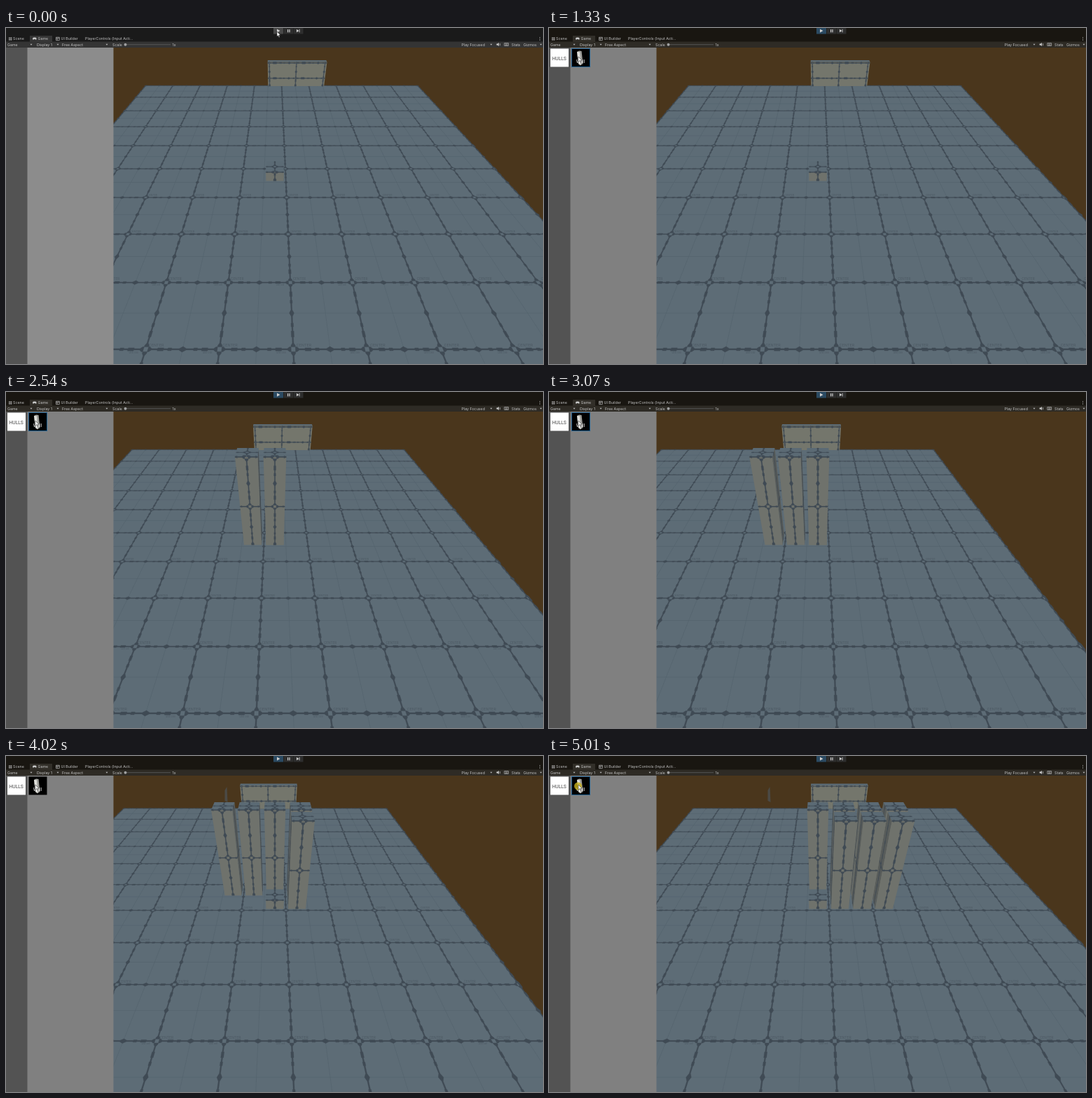
An HTML page that plays this animation: 767x480 px, repeating every 5.08 s.

```html
<!DOCTYPE html>
<html lang="en">
<head>
<meta charset="utf-8">
<title>Wall placement</title>
<style>
html, body { margin: 0; width: 100%; height: 100%; overflow: hidden; background: #4a361c; }
svg { display: block; width: 100vw; height: 100vh; }
text { font-family: Inter, "Open Sans", sans-serif; }
.ui text { font-size: 5.3px; fill: #c2c2c2; }
.mark { fill: #47535d; opacity: .75; }
</style>
</head>
<body>
<svg viewBox="0 0 767 480" preserveAspectRatio="none">
  <rect width="767" height="480" fill="#4a361c"/>
  <g id="scene"></g>

  <rect y="28" width="31" height="452" fill="#535353"/>
  <rect id="panel" x="30.5" y="28" width="123" height="452" fill="#8c8c8c"/>

  <g id="cards">
    <rect x="2" y="29.5" width="26" height="26" fill="#fff"/>
    <text x="14.7" y="45.8" font-size="6.7" text-anchor="middle" fill="#484848" style="font-family:Roboto,sans-serif">HULLS</text>
    <rect x="32.5" y="29.5" width="26" height="26" fill="#000"/>
    <path d="M40 34L43 32.5L46.5 33L48.5 51L44.5 53.5L42 51Z" fill="#9c9c98"/>
    <path d="M40 34L44 34.5L45.5 53L42 51Z" fill="#dededa"/>
    <text x="45" y="49.5" font-size="6.7" text-anchor="middle" fill="#fff" style="font-family:Roboto,sans-serif">Wall</text>
    <rect id="focus" x="32.5" y="29.5" width="26" height="26" fill="none" stroke="#1f5f8f"/>
  </g>

  <g class="ui">
    <rect id="top" width="767" height="20" fill="#1a1a1a"/>
    <rect id="tab" x="34" y="11" width="32" height="9" fill="#363636"/>
    <rect id="bar" y="19.5" width="767" height="8.5" fill="#343434"/>
    <g id="buttons">
      <rect id="play" x="382" y="0" width="14" height="8.5" fill="#484848"/>
      <rect x="396.5" y="0" width="14" height="8.5" fill="#2e2e2e"/>
      <rect x="411" y="0" width="13.5" height="8.5" fill="#2e2e2e"/>
    </g>
    <path d="M387 1.6L391.5 4L387 6.4ZM402 2h1.2v4.2h-1.2zM404.4 2h1.2v4.2h-1.2zM415 1.8L418.4 4L415 6.2ZM418.6 1.8h.9v4.4h-.9z" fill="#d0d0d0"/>
    <path d="M5 13v5M7.3 13v5M3.7 14.3h5M3.7 16.7h5M71.5 13.2h4.8v4.4h-4.8zM71.5 14.6h4.8M73.3 14.6v3" fill="none" stroke="#b8b8b8" stroke-width=".7"/>
    <path d="M38 15.2q0-1.7 1.7-1.7h2.2q1.7 0 1.7 1.7t-1.2 1.6l-.8-.8h-1.6l-.8.8q-1.2.1-1.2-1.6z" fill="#c8c8c8"/>
    <text x="10" y="17.2">Scene</text>
    <text x="45.5" y="17.2">Game</text>
    <text x="78.5" y="17.2">UI Builder</text>
    <text x="113" y="17.2">PlayerControls (Input Acti...</text>
    <path d="M762 13h.9v.9h-.9zM762 14.9h.9v.9h-.9zM762 16.8h.9v.9h-.9z" fill="#b8b8b8"/>
    <text x="2" y="25.5">Game</text>
    <text x="44" y="25.5">Display 1</text>
    <text x="80" y="25.5">Free Aspect</text>
    <text x="152" y="25.5">Scale</text>
    <path d="M172 23.7H235" stroke="#5e5e5e" stroke-width=".8"/>
    <circle cx="170.5" cy="23.7" r="2" fill="#a0a0a0"/>
    <text x="237.5" y="25.5">1x</text>
    <text x="650.5" y="25.5">Play Focused</text>
    <path d="M700.5 22.6h1.5l2-1.5v5l-2-1.5h-1.5zM705 22h.7v3.2h-.7z" fill="#c8c8c8"/>
    <path d="M711.8 21.6h5.8v3.8h-5.8zM713 23h3.4M713 24.3h3.4" fill="none" stroke="#bcbcbc" stroke-width=".7"/>
    <text x="722" y="25.5">Stats</text>
    <text x="739" y="25.5">Gizmos</text>
    <path id="arrows" fill="#b8b8b8"/>
  </g>

  <circle id="press" cx="41.5" cy="43" r="5.5" fill="#c9b21c" opacity=".8"/>
  <path id="cursor" d="M0 0V7.2L1.7 5.7L2.9 8.4L4 7.9L2.8 5.3H5Z" fill="#fff" stroke="#111" stroke-width=".5"/>
</svg>
<script>
const $ = id => document.getElementById(id);
const LOOP = 5080;
const CX = 384, CY = 254, FOCAL = 391.4, HEIGHT = 4;
const LINE = '#3f4a54', THIN = .009;

// Time, camera x, camera z
const MOVES = [[0, 0, 0], [2130, .5, 0], [2740, 1, 0], [3270, 1.5, 0], [3670, 1.5, -.5],
  [4020, 1, -.5], [4400, .5, -.5], [4680, 0, -.5]];
// Press time, release time, column x, column z
const CLICKS = [[1730, 1870, 0, 5], [2470, 2540, .5, 5], [2940, 3070, 1, 5], [3400, 3540, 1.5, 5],
  [3870, 3940, 1.5, 4.5], [4210, 4280, 1, 4.5], [4480, 4540, .5, 4.5], [5010, LOOP, 0, 4.5]];
const POINTER = [[0, 387, 5], [465, 387, 5], [660, 149, 58], [790, 92, 59], [990, 49, 49], [1130, 42, 41]];

// Half width of a grid line along one tile
const HALF = [[0, .03], [.05, .03], [.08, THIN], [.16, THIN], [.16, .019], [.24, .019], [.24, THIN],
  [.3, THIN], [.3, .017], [.35, .017], [.35, THIN], [.45, THIN], [.5, .035]];
const PROFILE = [...HALF, ...HALF.slice(1, -1).reverse().map(([t, w]) => [1 - t, w])];

let cam = { x: 0, z: 0 };

function project([x, y, z]) {
  const v = HEIGHT - y, depth = z - cam.z, d = v + depth;
  return [CX + FOCAL * Math.SQRT2 * (x - cam.x) / d, CY + FOCAL * (v - depth) / d];
}
const outline = pts => 'M' + pts.map(p => project(p).map(n => n.toFixed(1)).join(' ')).join('L');
const poly = pts => outline(pts) + 'Z';
const fill = (d, color) => `<path d="${d}" fill="${color}"/>`;
const ink = (d, w) => `<path d="${d}" fill="${LINE}" stroke="${LINE}" stroke-width="${w}"/>`;

// Ornamented grid line; at(t, offset) gives a point in space
function strip(at, a, b) {
  const pts = [[a, THIN]];
  for (let n = Math.floor(a); n <= b; n++)
    for (const [t, w] of PROFILE)
      if (n + t >= a && n + t <= b) pts.push([n + t, w]);
  pts.push([b, THIN]);
  return poly([...pts.map(([t, w]) => at(t, w)), ...pts.reverse().map(([t, w]) => at(t, -w))]);
}

function floor() {
  const x0 = -4.75, z0 = .25;
  let lines = '', faint = '', marks = '';
  for (let k = 0; k <= 10; k++) {
    lines += strip((t, o) => [x0 + k + o, 0, z0 + t], 0, 10);
    lines += strip((t, o) => [x0 + t, 0, z0 + k + o], 0, 10);
    if (k < 10) {
      faint += outline([[x0 + k + .5, 0, z0], [x0 + k + .5, 0, z0 + 10]]);
      faint += outline([[x0, 0, z0 + k + .5], [x0 + 10, 0, z0 + k + .5]]);
    }
  }
  for (let r = 0; r < 5; r++)
    for (let k = 0; k < 10; k++) {
      const p = [x0 + k, 0, z0 + r], [x, y] = project(p);
      const s = project([p[0] + 1, 0, p[2]])[0] - x;
      if (x < 130 || x > 780 || y > 490) continue;
      marks += `<text class="mark" x="${x + s * .04}" y="${y - s * .035}" font-size="${s * .052}">CENTER</text>`;
      if (s > 85) marks += `<text class="mark" x="${x - s * .1}" y="${y + s * .055}" font-size="${s * .035}" text-anchor="end">unit cell</text>`;
    }
  return fill(poly([[x0, 0, z0], [x0, 0, z0 + 10], [x0 + 10, 0, z0 + 10], [x0 + 10, 0, z0]]), '#5d6c76') +
    `<path d="${faint}" fill="none" stroke="#53626c" stroke-width=".6"/>` + ink(lines, .4) + marks;
}

// Box from x0..x1, z0..z1, standing on the floor
function box(x0, x1, z0, z1, h, front) {
  let out = '';
  const side = x0 > cam.x ? x0 : x1 < cam.x ? x1 : null;
  if (side !== null)
    out += fill(poly([[side, 0, z0], [side, h, z0], [side, h, z1], [side, 0, z1]]), '#585c5a');
  out += fill(poly([[x0, h, z0], [x1, h, z0], [x1, h, z1], [x0, h, z1]]), '#5b6a74');
  return out + fill(poly([[x0, 0, z0], [x1, 0, z0], [x1, h, z0], [x0, h, z0]]), front);
}

function farWall() {
  const x0 = -.25, x1 = 1.8, z = 10.2, h = .82;
  let lines = '';
  for (const x of [x0 + .06, .75, x1 - .06]) lines += strip((t, o) => [x + o, t, z], 0, h);
  for (const y of [.28, h - .03]) lines += strip((t, o) => [t, y + o, z], x0, x1);
  return box(x0, x1, z, z + .2, h, '#74766c') + ink(lines, .4);
}

function column(x, z, h) {
  const r = .2, front = z - r;
  let lines = strip((t, o) => [x + o, t, front], 0, h) +
    strip((t, o) => [x + o, h, z + t], -r, r) +
    strip((t, o) => [x + t, h, z + o], -r, r);
  for (const y of h > 1 ? [1, h] : [h]) lines += strip((t, o) => [x + t, y + o, front], -r, r);
  let sideLines = '';
  if (h > 1 && x !== cam.x) {
    const s = x > cam.x ? x - r : x + r;
    sideLines = strip((t, o) => [s, t, z + o], 0, h) + strip((t, o) => [s, 1 + o, z + t], -r, r);
  }
  return box(x - r, x + r, front, z + r, h, '#6f726c') + ink(sideLines + lines, .3);
}

function drawScene(count) {
  const items = CLICKS.slice(0, count).map(([, , x, z]) => ({ x, z, h: 2 }));
  items.push({ x: cam.x, z: cam.z + 5, h: .25 });
  items.sort((a, b) => b.z - a.z || Math.abs(b.x - cam.x) - Math.abs(a.x - cam.x) || a.h - b.h);
  const sliver = cam.z < 0 ? fill('M312.5 49L315.5 44L316.5 66L312.5 64Z', '#4b4a45') : '';
  $('scene').innerHTML = sliver + floor() + farWall() + items.map(i => column(i.x, i.z, i.h)).join('');
}

function pointerAt(time) {
  const t = Math.floor(time / 66) * 66;
  const i = POINTER.findIndex(k => k[0] > t);
  if (i < 0) return POINTER.at(-1).slice(1);
  const [ta, xa, ya] = POINTER[i - 1], [tb, xb, yb] = POINTER[i], f = (t - ta) / (tb - ta);
  return [xa + (xb - xa) * f, ya + (yb - ya) * f];
}

const show = (id, on) => $(id).setAttribute('visibility', on ? 'visible' : 'hidden');
const paint = (id, color) => $(id).setAttribute('fill', color);

let last = '';
function render(t) {
  const move = MOVES.filter(m => m[0] <= t).at(-1);
  const count = CLICKS.filter(c => c[1] <= t).length;
  const pressed = CLICKS.filter(c => c[0] <= t).at(-1);
  const key = move + '|' + count;
  if (key !== last) {
    cam = { x: move[1], z: move[2] };
    drawScene(count);
    last = key;
  }
  const tinted = t >= 130, loaded = t >= 330;
  paint('top', tinted ? '#191611' : '#1a1a1a');
  paint('tab', tinted ? '#322f29' : '#363636');
  paint('bar', tinted ? '#2e2b25' : '#343434');
  paint('play', t >= 70 ? '#2b4a62' : '#484848');
  paint('panel', loaded ? '#808080' : '#8c8c8c');
  show('cards', loaded);
  show('focus', loaded && (pressed ? pressed[0] > move[0] : t >= 1330));
  show('press', pressed && t < pressed[1]);
  $('cursor').setAttribute('transform', `translate(${pointerAt(t)})`);
}

$('arrows').setAttribute('d', [36, 74, 144, 693, 764].map(x => `M${x - 1.5} 22.8h3l-1.5 2z`).join(''));

const start = performance.now();
function tick() {
  render((performance.now() - start) % LOOP);
  requestAnimationFrame(tick);
}
render(0);
requestAnimationFrame(tick);
</script>
</body>
</html>
```
